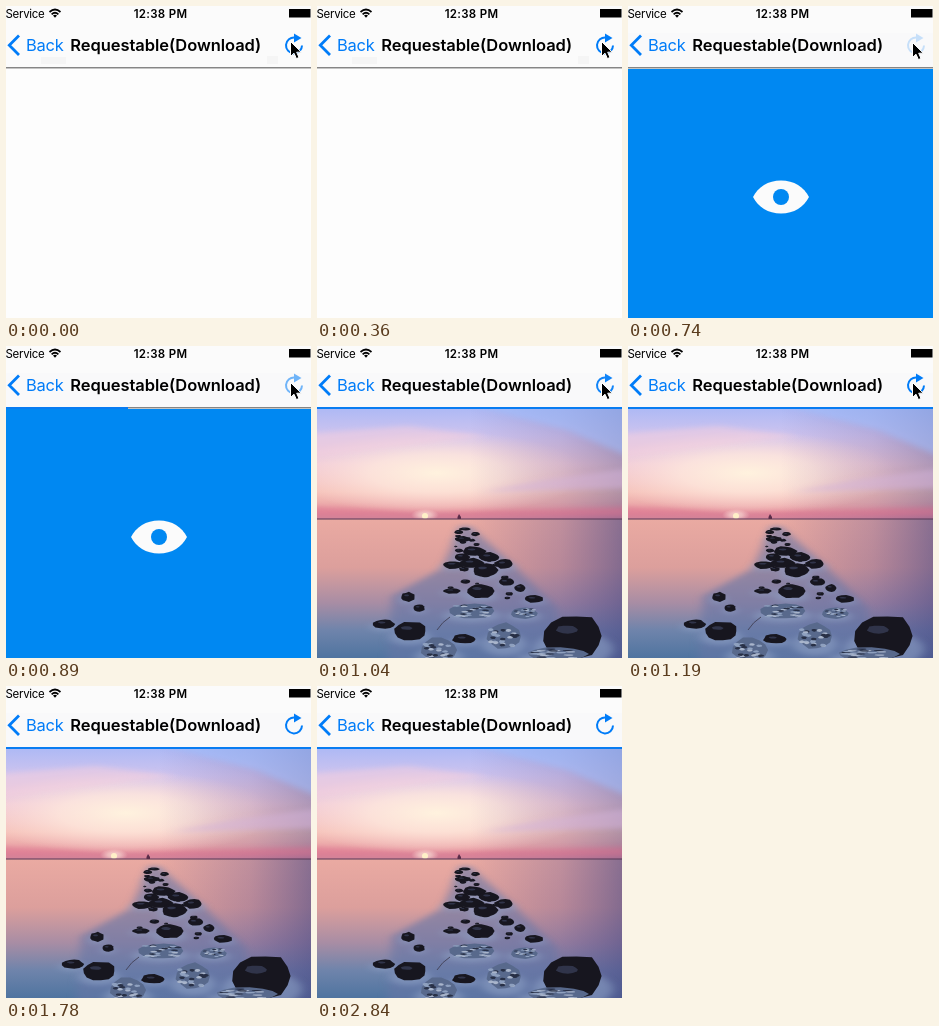
Recreate the animation shown at these times as an HTML page. Size 305 px wide and 312 px high, loop 3.55 s.

```html
<!DOCTYPE html>
<html lang="en">
<head>
<meta charset="utf-8">
<title>Download demo</title>
<style>
  html, body { margin: 0; width: 100%; height: 100%; overflow: hidden; background: #fdfdfd; }
  svg { display: block; width: 100%; height: 100%; }
  text { font-family: Inter, Roboto, sans-serif; }
  .status { font-size: 11.5px; }
  .blue { fill: #007cf8; }
  .stroke { fill: none; stroke: #007cf8; }

  #placeholder, #photo, #tint, #idle, #refresh, #cursor, #bar {
    animation: 3550ms step-end infinite;
  }
  #placeholder { animation-name: placeholder; }
  #photo { animation-name: photo; }
  #tint { animation-name: loaded; }
  #idle { animation-name: idle; }
  #refresh { animation-name: refresh; }
  #cursor { animation-name: cursor; }
  #bar { animation-name: progress; }

  @keyframes placeholder {
    0% { visibility: hidden; }
    20.845% { visibility: visible; }
    29.296%, 100% { visibility: hidden; }
  }
  @keyframes photo {
    0% { visibility: hidden; }
    29.296%, 100% { visibility: visible; }
  }
  @keyframes loaded {
    0% { visibility: hidden; }
    20.845%, 100% { visibility: visible; }
  }
  @keyframes idle {
    0% { visibility: visible; }
    20.845%, 100% { visibility: hidden; }
  }
  @keyframes refresh {
    0% { opacity: 1; }
    20.845% { opacity: .2; }
    25.07% { opacity: .55; }
    29.296% { opacity: .93; }
    33.521%, 100% { opacity: 1; }
  }
  @keyframes cursor {
    0% { transform: translate(284px, 35px); }
    16.901% { transform: translate(284px, 36px); visibility: visible; }
    50.141%, 100% { transform: translate(284px, 36px); visibility: hidden; }
  }
  @keyframes progress {
    0% { transform: scaleX(0); }
    25.07% { transform: scaleX(.4); }
    29.296%, 100% { transform: scaleX(1); }
  }
</style>
</head>
<body>
<svg viewBox="0 0 305 312" xmlns="http://www.w3.org/2000/svg">
  <defs>
    <linearGradient id="sky" x2="0" y2="1">
      <stop offset="0" stop-color="#adb9f5"/>
      <stop offset=".25" stop-color="#cfc4ee"/>
      <stop offset=".5" stop-color="#f0cbd8"/>
      <stop offset=".75" stop-color="#f5c2b9"/>
      <stop offset=".92" stop-color="#e8a0a4"/>
      <stop offset="1" stop-color="#cc8299"/>
    </linearGradient>
    <linearGradient id="sea" x2="0" y2="1">
      <stop offset="0" stop-color="#eaaaa2"/>
      <stop offset=".35" stop-color="#dc9f9c"/>
      <stop offset=".6" stop-color="#a98da4"/>
      <stop offset=".8" stop-color="#6f84ab"/>
      <stop offset="1" stop-color="#4f74a0"/>
    </linearGradient>
    <linearGradient id="shade">
      <stop offset=".5" stop-color="#5e5090" stop-opacity="0"/>
      <stop offset=".8" stop-color="#5e5090" stop-opacity=".3"/>
      <stop offset="1" stop-color="#4c4a86" stop-opacity=".62"/>
    </linearGradient>
    <radialGradient id="glow">
      <stop offset="0" stop-color="#fff2de"/>
      <stop offset=".45" stop-color="#ffeade" stop-opacity=".75"/>
      <stop offset="1" stop-color="#ffe0dc" stop-opacity="0"/>
    </radialGradient>
    <filter id="soft" x="-20%" y="-80%" width="140%" height="260%">
      <feGaussianBlur stdDeviation="5 2.500"/>
    </filter>
    <clipPath id="frame"><path d="M0 62H305V312H0Z"/></clipPath>
  </defs>

  <rect width="305" height="312" fill="#fdfdfd"/>

  <g id="placeholder">
    <rect y="62" width="305" height="250" fill="#0088f2"/>
    <path fill="#fbfbfb" d="M125 191C130 181 140 174.500 153 174.500S176 181 181 191C176 201 166 207.500 153 207.500S130 201 125 191Z"/>
    <circle cx="153" cy="191" r="8" fill="#0088f2"/>
  </g>

  <g id="photo"><g clip-path="url(#frame)">
    <rect y="62" width="305" height="112" fill="url(#sky)"/>
    <ellipse cx="120" cy="127" rx="150" ry="42" fill="url(#glow)"/>
    <rect y="62" width="305" height="112" fill="url(#shade)" opacity=".65"/>
    <g filter="url(#soft)" opacity=".5">
      <path fill="#9fc0ff" d="M150 58H315V112L250 84Z"/>
      <path fill="#f7cfdc" d="M-10 88L90 80L170 90L90 100L-10 112Z"/>
      <path fill="#d3b4dc" d="M315 122L225 134L165 146L315 142Z"/>
      <path fill="#d9688a" d="M-10 160L110 166L315 161V171H-10Z"/>
    </g>
    <ellipse cx="108" cy="169" rx="14" ry="6" fill="url(#glow)" opacity=".7"/>
    <circle cx="108" cy="170" r="3" fill="#fff0c8"/>
    <rect y="173" width="305" height="139" fill="url(#sea)"/>
    <rect y="173" width="305" height="139" fill="url(#shade)"/>
    <path filter="url(#soft)" fill="#6676a6" opacity=".6" d="M143 180H153L200 222L240 262V320H70L75 250L125 222Z"/>
    <path d="M0 173H305" stroke="#563754"/>
    <path d="M140.500 173V171L142 168L144 171V173Z" fill="#5a2d49"/>
    <g id="rocks"></g>
    <path d="M120 284Q125 276 133 271" fill="none" stroke="#46465e"/>
  </g></g>

  <rect width="305" height="61" fill="#fbfbfb"/>
  <rect id="tint" y="27" width="305" height="34" fill="#f9f9fa"/>
  <g id="idle" fill="#f5f5f5">
    <rect x="35" y="51" width="25" height="7"/>
    <rect x="261" y="50" width="11" height="8"/>
  </g>
  <rect y="61" width="305" height="1" fill="#858585"/>
  <rect y="62" width="305" height="1" fill="#c4c4c4"/>
  <rect id="bar" y="61" width="305" height="2" fill="#087cf2"/>

  <text class="status" x="-.5" y="11.500" letter-spacing="-.3">Service</text>
  <g fill="none" stroke="#000" stroke-width="1.700">
    <path d="M43.500 6Q49 1 54.500 6M45.600 8.300Q49 5.200 52.400 8.300"/>
    <path fill="#000" stroke="none" d="M47 9.500Q49 8 51 9.500L49 11.800Z"/>
  </g>
  <text class="status" x="154.500" y="11.500" text-anchor="middle" font-weight="600" letter-spacing=".3">12:38 PM</text>
  <rect x="283" y="3" width="21.500" height="8.500"/>

  <path class="stroke" stroke-width="2.800" d="M13 29.500L3.300 39.300L13 49"/>
  <text class="blue" x="20" y="45" font-size="16.500" letter-spacing="-.25">Back</text>
  <text x="159.700" y="45" text-anchor="middle" font-size="16.500" font-weight="600" letter-spacing="-.05">Requestable(Download)</text>

  <g id="refresh">
    <path class="stroke" stroke-width="2" d="M289 31.500A8 8 0 1 0 296 39.500"/>
    <path class="blue" d="M288 27.500L295.500 32L288 36.500Z"/>
  </g>
  <g id="cursor">
    <path d="M.5 .5V15.500L4 12.200L6.400 17.600L9 16.500L6.700 11.200H11.300Z" stroke="#fff" stroke-width="1"/>
  </g>
</svg>
<script>
  // Each rock: centre x, centre y, half width, half height.
  const rocks = [
    [148, 183, 6, 1.5], [146, 193, 8, 3], [157, 205, 12, 5], [145, 211, 8, 4],
    [172, 211, 11, 5], [137, 219, 12, 4], [155, 217, 12, 5], [187, 218, 10, 5],
    [168, 224, 13, 7], [135, 245, 9, 3], [163, 245, 14, 8], [189, 236, 8, 4],
    [203, 242, 6, 4], [217, 253, 10, 4], [91, 251, 7, 5], [102, 262, 6, 4],
    [67, 278, 11, 5], [93, 285, 17, 10], [147, 293, 12, 5], [256, 290, 32, 22]
  ];
  const paleRocks = [
    [155, 265, 23, 8], [207, 267, 14, 6], [187, 290, 18, 14],
    [122, 304, 19, 13], [240, 308, 32, 7]
  ];
  let seed = 9;
  const random = () => (seed = seed * 16807 % 2147483647) / 2147483647;
  const spread = size => (random() - .5) * size;

  const blob = (x, y, w, h, fill) => {
    const points = Array.from({ length: 13 }, (_, i) => {
      const angle = i / 13 * 2 * Math.PI;
      const reach = .85 + random() * .2;
      return [x + w * reach * Math.cos(angle), y + h * reach * Math.sin(angle)]
        .map(v => v.toFixed(1)).join();
    });
    return `<polygon points="${points.join(' ')}" fill="${fill}"/>`;
  };

  const mist = ([x, y, w, h]) =>
    `<ellipse cx="${x}" cy="${y + h * .6}" rx="${w * 1.25}" ry="${h * .8}" fill="#8fa3c6"/>`;

  const darkRock = ([x, y, w, h]) =>
    blob(x, y, w, h, '#17161f') +
    blob(x - w * .2, y - h * .3, w * .35, h * .2, '#30344a');

  const paleRock = ([x, y, w, h]) => {
    let shape = blob(x, y, w, h, '#58698c');
    for (let n = 0; n < 24; n++) {
      shape += blob(x + spread(w * 1.5), y + spread(h * 1.4), w * .16, h * .1,
        ['#8ea0bf', '#283046', '#a9b5cb'][n % 3]);
    }
    return shape;
  };

  // Small stones fan out towards the viewer.
  const pebbles = Array.from({ length: 34 }, (_, i) => {
    const depth = i / 34;
    const size = 1.5 + random() * 4;
    return [148 + depth * 18 + spread(16 + depth * 65), 184 + depth * 70, size, size * .45];
  });

  document.getElementById('rocks').innerHTML =
    `<g filter="url(#soft)" opacity=".55">${[...rocks, ...paleRocks].map(mist).join('')}</g>` +
    [...pebbles, ...rocks].map(darkRock).join('') + paleRocks.map(paleRock).join('');
</script>
</body>
</html>
```
